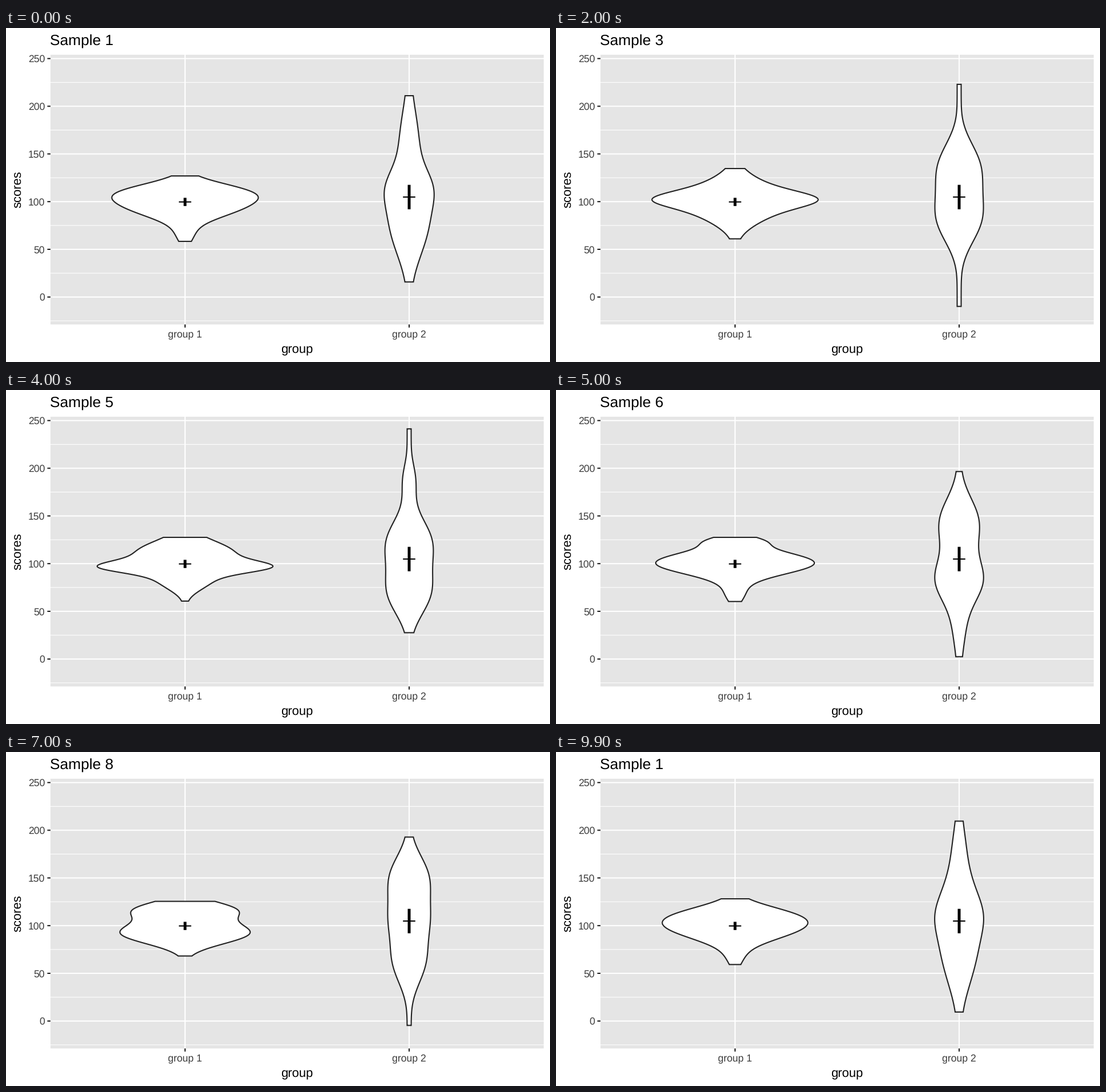
These frames come from a looping animation (954x587 px, 10 s). A matplotlib script:

```python
import numpy as np
import matplotlib.pyplot as plt
from matplotlib.animation import FuncAnimation
from matplotlib.patches import Polygon, Rectangle

W, H, DPI = 954, 587, 64
PX = 72 / DPI  # points per pixel
LEFT, RIGHT, TOP, BOTTOM = 78, 943, 46.5, 521
CENTRES = (314, 707)
INK, LABEL = "#222222", "#3d3d3d"
HOLD, STEPS = 5, 5  # still frames after the first, then tween steps
MIN_HALF = 3.5  # half width left in empty tails

plt.rcParams["font.family"] = "Liberation Sans"
plt.rcParams["text.hinting"] = "none"


def score_y(v):
    return 472.8 - 1.6764 * v


def violin(top, bottom, *bumps):
    """Density trimmed to top..bottom: a sum of (centre, half width, spread) bells."""
    y = np.linspace(top, bottom, 256)
    w = sum(h * np.exp(-((y - c) / s) ** 2 / 2) for c, h, s in bumps)
    return np.array([y, np.hypot(w, MIN_HALF)])


GROUP_1 = [
    violin(260, 375, (288, 86, 17), (316, 84, 20), (364, 12, 16)),
    violin(238, 376, (307, 95, 10), (306, 82, 28)),
    violin(247, 370.5, (304, 92, 31), (301, 54, 13)),
    violin(250, 371, (306, 110, 21), (308, 28, 40)),
    violin(259, 371, (287, 85, 22), (311, 88, 10), (334, 42, 18)),
    violin(259, 371.7, (265, 33, 9), (304, 139, 20), (358, 15, 16)),
    violin(248, 369, (305, 75, 13), (306, 78, 28)),
    violin(262.5, 358.5, (277, 81, 15), (318, 112, 19)),
    violin(244, 355.5, (262, 36, 11), (299.5, 147, 14.5), (338, 62, 14)),
    violin(250, 367.5, (258, 18, 15), (299, 50, 15), (305, 92, 26)),
]
GROUP_2 = [
    violin(119, 446.3, (200, 15.5, 60), (279, 17.5, 32), (342, 33, 58)),
    violin(120, 435, (265, 24, 75), (330, 25, 55)),
    violin(99, 489.3, (244, 34, 43), (334, 37, 44)),
    violin(110, 490.5, (290, 30, 55), (300, 16, 95)),
    violin(68.3, 426.5, (158, 10, 30), (268, 38, 42), (356, 35, 40)),
    violin(143.3, 468.7, (234, 34, 44), (333, 38, 38), (415, 9.5, 45)),
    violin(130, 483.7, (250, 30, 54), (345, 28, 54)),
    violin(149.5, 480.5, (222, 33, 40), (293, 24, 34), (365, 28, 42)),
    violin(150.5, 485.8, (235, 24, 62), (328, 35, 48)),
    violin(131.5, 499.7, (160, 7, 40), (268, 37, 38), (335, 26, 45), (430, 9, 55)),
]
SAMPLES = list(zip(GROUP_1, GROUP_2))

fig = plt.figure(figsize=(W / DPI, H / DPI), dpi=DPI, facecolor="white")
ax = fig.add_axes([0, 0, 1, 1])
ax.set_xlim(0, W)
ax.set_ylim(H, 0)
ax.axis("off")


def line(x0, y0, x1, y1, color, width, z):
    ax.plot([x0, x1], [y0, y1], color=color, lw=width * PX, zorder=z,
            solid_capstyle="butt", snap=False)


def text(x, y, s, size, color="black", ha="center", **kw):
    return ax.text(x, y, s, fontsize=size * PX, color=color, ha=ha,
                   va="baseline", **kw)


# Panel, grid and axes
ax.add_patch(Rectangle((LEFT, TOP), RIGHT - LEFT, BOTTOM - TOP, fc="#e5e5e5", lw=0))
for v in range(-25, 250, 50):
    line(LEFT, score_y(v), RIGHT, score_y(v), "white", 1.1, 2)
for v in range(0, 251, 50):
    y = score_y(v)
    line(LEFT, y, RIGHT, y, "white", 2.1, 2)
    line(LEFT - 5.5, y, LEFT, y, INK, 2.1, 2)
    text(68, y + 6.4, str(v), 17.6, LABEL, "right")
for i, x in enumerate(CENTRES, 1):
    line(x, TOP, x, BOTTOM, "white", 2.1, 2)
    line(x, BOTTOM, x, BOTTOM + 5.5, INK, 2.1, 2)
    text(x, 544.3, f"group {i}", 17.6, LABEL)
text(510, 571, "group", 22)
text(27.5, 283.5, "scores", 22, rotation=90, rotation_mode="anchor")
title = text(76.7, 31, "", 26.4, ha="left")

shapes = [ax.add_patch(Polygon([(x, 300)], closed=True, fc="white", ec=INK,
                               lw=2.1 * PX, joinstyle="miter", zorder=3))
          for x in CENTRES]

# Mean and interval marks
for x, mean, half in zip(CENTRES, (99.7, 104.8), (4.3, 12.8)):
    line(x, score_y(mean - half), x, score_y(mean + half), "black", 5, 4)
    line(x - 10.8, score_y(mean), x + 10.8, score_y(mean), "black", 2.1, 4)


def draw(n):
    state, k = divmod(n, HOLD + STEPS)
    following = (state + 1) % len(SAMPLES)
    t = max(0, k - HOLD) / STEPS
    for x, shape, a, b in zip(CENTRES, shapes, SAMPLES[state], SAMPLES[following]):
        y, w = (1 - t) * a + t * b
        shape.set_xy(np.column_stack([np.r_[x - w, (x + w)[::-1]], np.r_[y, y[::-1]]]))
    title.set_text(f"Sample {(state if t < 0.5 else following) + 1}")
    return [*shapes, title]


anim = FuncAnimation(fig, draw, frames=len(SAMPLES) * (HOLD + STEPS), interval=100,
                     repeat=True, repeat_delay=0)
plt.show()
```
